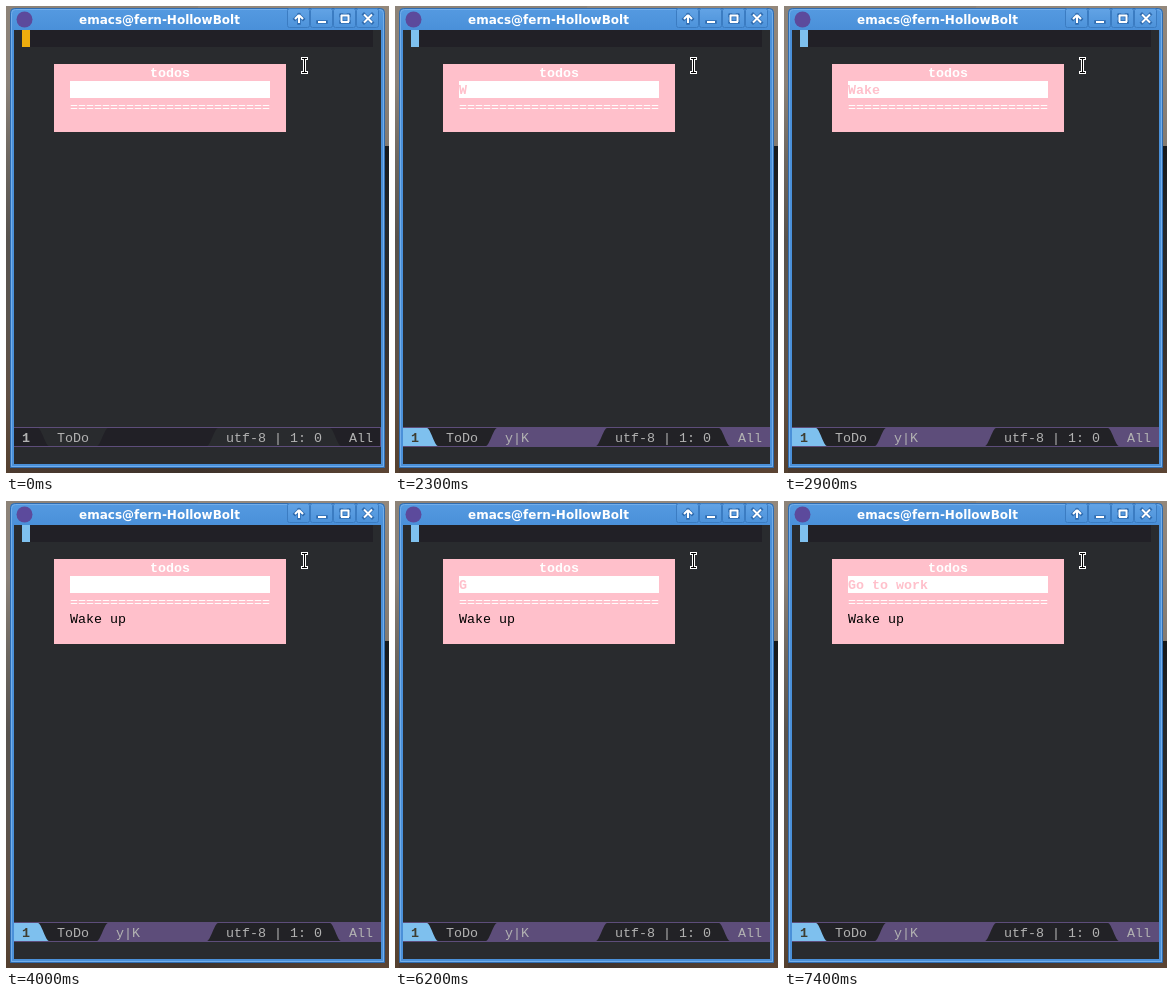
Write an HTML page with a canvas that moves like this. It is 383x467 px and loops after 8 s.

```html
<!DOCTYPE html>
<html lang="en">
<head>
<meta charset="utf-8">
<title>Todos</title>
<style>
  html, body { margin: 0; width: 100%; height: 100%; overflow: hidden; background: #292b2e; }
  canvas { display: block; }
</style>
</head>
<body>
<canvas id="stage" width="383" height="467"></canvas>
<script>
const ctx = document.getElementById('stage').getContext('2d');
const LOOP = 8000;
const CELL = 8, LINE = 17, LEFT = 16, TOP = 24;
const PINK = '#ffc0cb', BG = '#292b2e', DARK = '#212026', PURPLE = '#5d4d7a', SKY = '#7ec0ee', GREY = '#b2b2b2';
const BLUE = '#4a90d9', EDGE = '#2f6cb0', SHINE = '#73aeea';
const FOCUS = 500, ADDED = 4000;

// Time at which each character appears.
const first = { text: 'Wake up', at: [2300, 2600, 2700, 2900, 3100, 3300, 3500] };
const second = { text: 'Go to work', at: [6200, 6400, 6500, 6600, 6800, 6850, 6900, 7100, 7200, 7400] };

function rect(x, y, w, h, color) {
  ctx.fillStyle = color;
  ctx.fillRect(x, y, w, h);
}

function roundBox(x, y, w, h, radii, fill, stroke) {
  ctx.beginPath();
  ctx.roundRect(x, y, w, h, radii);
  ctx.lineWidth = 1;
  if (fill) {
    ctx.fillStyle = fill;
    ctx.fill();
  }
  ctx.strokeStyle = stroke;
  ctx.stroke();
}

function mono(text, x, y, color, bold) {
  ctx.font = (bold ? 'bold ' : '') + '13.333px "Liberation Mono", monospace';
  ctx.textAlign = 'left';
  ctx.fillStyle = color;
  [...text].forEach((ch, i) => ctx.fillText(ch, x + i * CELL, y));
}

const rowY = row => TOP + row * LINE;
const rowText = (text, col, row, color, bold) =>
  mono(text, LEFT + col * CELL, rowY(row) + 13, color, bold);

function typed(entry, t) {
  return entry.text.slice(0, entry.at.filter(at => at <= t).length);
}

function gradient(x0, y0, x1, y1, colors) {
  const g = ctx.createLinearGradient(x0, y0, x1, y1);
  colors.forEach((c, i) => g.addColorStop(i / (colors.length - 1), c));
  return g;
}

function desktop() {
  rect(0, 0, 192, 467, gradient(0, 0, 0, 467,
    ['#8d8378', '#8a8178', '#6c665f', '#57524d', '#5b544d', '#5f4f43', '#54402f']));
  rect(192, 0, 191, 140, gradient(0, 0, 0, 140, ['#94887b', '#857b70']));
  rect(192, 140, 191, 327, gradient(0, 140, 0, 467,
    ['#17191b', '#25282a', '#2d2d2c', '#43382f', '#5c4433']));
  rect(4, 462, 376, 5, gradient(0, 0, 383, 0, ['#4b3a2f', '#3d322b', '#5c4433']));
}

function strokeLines(points, color, width) {
  ctx.strokeStyle = color;
  ctx.lineWidth = width;
  ctx.beginPath();
  for (const [x0, y0, x1, y1] of points) {
    ctx.moveTo(x0, y0);
    ctx.lineTo(x1, y1);
  }
  ctx.stroke();
}

function icon(points) {
  ctx.lineCap = 'square';
  strokeLines(points, EDGE, 3.5);
  ctx.lineCap = 'butt';
  strokeLines(points, '#fff', 2);
}

function button(x) {
  roundBox(x + 0.5, 2.5, 22, 19, 2, gradient(0, 3, 0, 22, ['#62a3e5', '#4c92da']), '#3b7cc2');
}

function frame() {
  const top = [4, 4, 0, 0];
  roundBox(4.5, 2.5, 374, 459, top, BLUE, EDGE);
  rect(6, 4, 371, 20, gradient(0, 4, 0, 24, ['#5499e0', BLUE]));
  roundBox(5.5, 3.5, 372, 457, top, null, SHINE);

  ctx.fillStyle = '#5c4a9c';
  ctx.beginPath();
  ctx.arc(18.5, 13.5, 8, 0, 7);
  ctx.fill();

  ctx.font = 'bold 12px "DejaVu Sans", sans-serif';
  ctx.textAlign = 'center';
  ctx.fillStyle = '#fff';
  ctx.fillText('emacs@fern-HollowBolt', 153.5, 18);

  [281, 304, 327, 350].forEach(button);
  icon([[293, 9, 293, 17], [289, 13, 293, 9], [293, 9, 297, 13]]);
  icon([[312, 16, 320, 16]]);
  icon([[335, 9.5, 343, 9.5], [335.5, 9, 335.5, 16], [342.5, 9, 342.5, 16], [335, 16, 343, 16]]);
  icon([[358, 8.5, 366, 16.5], [366, 8.5, 358, 16.5]]);

  rect(8, 24, 367, 434, BG);
}

// Fills the mode line up to a slanted edge running from xTop to xBottom.
function segment(xTop, xBottom, color) {
  const bend = (xBottom - xTop) * 0.3;
  ctx.fillStyle = color;
  ctx.beginPath();
  ctx.moveTo(8, 422);
  ctx.lineTo(xTop, 422);
  ctx.bezierCurveTo(xTop + bend, 422, xBottom - bend, 440, xBottom, 440);
  ctx.lineTo(8, 440);
  ctx.fill();
}

function modeLine(active) {
  const side = active ? PURPLE : DARK;
  const main = active ? '#222226' : BG;
  rect(8, 421, 367, 20, PURPLE);
  rect(8, 422, 366, 18, side);
  segment(324, 335, main);
  segment(212, 201, side);
  segment(102, 91, main);
  segment(32, 43, active ? SKY : DARK);
  const y = 436;
  mono('1', 16, y, active ? '#3e3d31' : GREY, true);
  mono('ToDo', 51, y, GREY);
  if (active) mono('y|K', 110, y, GREY);
  mono('utf-8 | 1: 0', 220, y, GREY);
  mono('All', 343, y, GREY);
}

function todos(t) {
  const added = t >= ADDED;
  rect(48, rowY(2), 232, LINE * (added ? 5 : 4), PINK);
  rowText('todos', 16, 2, '#fff', true);
  rect(64, rowY(3), 200, LINE, '#fff');
  rowText(typed(added ? second : first, t), 6, 3, PINK, true);
  rowText('='.repeat(25), 6, 4, '#fff');
  if (added) rowText(first.text, 6, 5, '#000');
}

function pointer() {
  const beam = (grow, color) => {
    for (const y of [52, 66]) rect(296 - grow, y - grow, 5 + 2 * grow, 1 + 2 * grow, color);
    rect(298 - grow, 52, 1 + 2 * grow, 15, color);
  };
  beam(1, '#fff');
  beam(0, '#000');
}

function draw(t) {
  const active = t >= FOCUS;
  desktop();
  frame();
  rect(LEFT, TOP, 351, LINE, DARK);
  rect(LEFT, TOP, CELL, LINE, active ? SKY : '#eead0e');
  todos(t);
  modeLine(active);
  pointer();
}

const start = performance.now();
function tick() {
  draw((performance.now() - start) % LOOP);
  requestAnimationFrame(tick);
}
tick();
</script>
</body>
</html>
```
